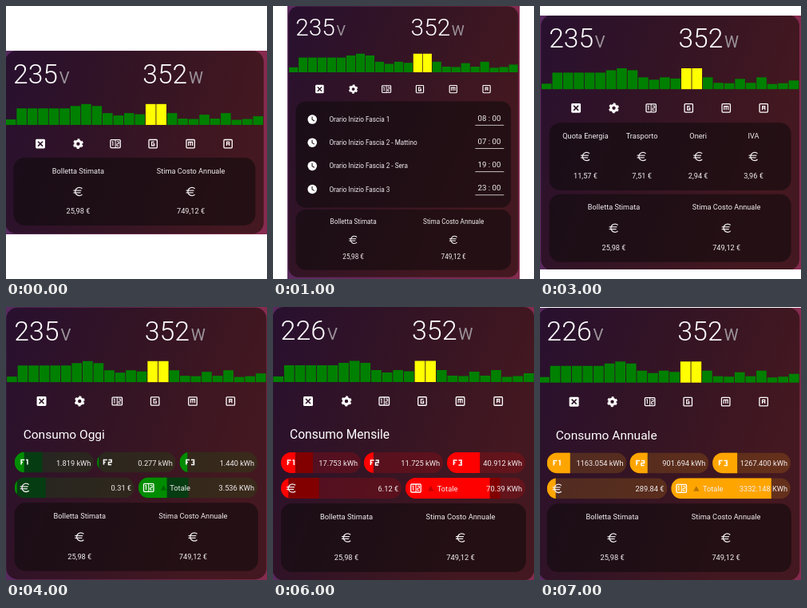
Animation, 327 px wide and 342 px high, one loop 8000 ms. Source, as an HTML page with a canvas:

```html
<!DOCTYPE html>
<html lang="it">
<head>
<meta charset="utf-8">
<style>
  html, body { margin: 0; width: 100%; height: 100%; overflow: hidden; background: #fff; }
  canvas { display: block; width: 327px; height: 342px; }
</style>
</head>
<body>
<canvas id="stage"></canvas>
<script>
const WIDTH = 327, HEIGHT = 342, LOOP = 8000;
const canvas = document.getElementById('stage');
const ctx = canvas.getContext('2d');
const ratio = window.devicePixelRatio || 1;
canvas.width = WIDTH * ratio;
canvas.height = HEIGHT * ratio;

const BARS = [7, 21, 21, 21, 21, 21, 24, 26.5, 24, 15, 12, 15, 13.5, 26.5, 26.5,
              15, 8, 7.5, 13, 8, 15, 6.5, 7.5, 11];
const SLOTS = ['08 : 00', '07 : 00', '19 : 00', '23 : 00'];
const SLOT_NAMES = ['1', '2 - Mattino', '2 - Sera', '3'];
const COSTS = [['Quota Energia', '11,57 €'], ['Trasporto', '7,51 €'], ['Oneri', '2,94 €'], ['IVA', '3,96 €']];
const TOTALS = [['Bolletta Stimata', '25,98 €'], ['Stima Costo Annuale', '749,12 €']];

// Square icon glyphs on a 2 x 2 grid: strokes of "xy" points.
const GLYPHS = {
  1: ['00 10 12'],
  2: ['00 20 21 01 02 22'],
  3: ['00 20 22 02', '11 21'],
  F: ['20 00 02', '01 11'],
  G: ['20 00 02 22 21 11'],
  M: ['02 00 20 22', '10 12'],
  A: ['02 00 20 22', '01 21']
};

// Each gauge: value text, bright share, dim share.
const today = {
  title: 'Consumo Oggi', color: '#008c00', dim: '#063c12', rgb: '0,128,0', tip: '#006400',
  gauges: [['1.819 kWh', .12, .35], ['0.277 kWh', .02, .03], ['1.440 kWh', .1, .1],
           ['0.31 €', .02, .26], ['3.536 KWh', .24, .42]]
};
const month = {
  title: 'Consumo Mensile', color: '#ff0000', dim: '#820000', rgb: '255,0,0', tip: '#c00000',
  gauges: [['17.753 kWh', .18, .4], ['11.725 kWh', .12, .12], ['40.912 kWh', .42, .42],
           ['6.12 €', .061, .315], ['70.39 KWh', .704, .79]]
};
const year = {
  title: 'Consumo Annuale', color: '#ffa500', dim: '#805200', rgb: '255,165,0', tip: '#b87400',
  gauges: [['1163.054 kWh', .29, .29], ['901.694 kWh', .225, .225], ['1267.400 kWh', .317, .317],
           ['289.84 €', .072, .072], ['3332.148 KWh', .839, .839]]
};

const scenes = [
  { start: 0, page: [0, 56, 327, 230], x: -.4, y: 56.2, scale: .987, volts: '235', totalsY: 135.6 },
  { start: 1000, page: [18, 0, 291, 342], x: 19.8, y: .5, scale: .878, volts: '235', totalsY: 290, body: drawSlots },
  { start: 3000, page: [0, 12, 327, 318], x: 1.7, y: 11.4, scale: .987, volts: '235', totalsY: 227.3,
    body: () => drawPanel(136.5, COSTS, [56, 127.5, 199, 269.3]) },
  { start: 4000, x: .8, y: .7, scale: .994, volts: '235', usage: today },
  { start: 5000, x: 0, y: 0, scale: 1, volts: '226', usage: month },
  { start: 7000, page: [0, 1, 327, 341], x: -1.2, y: 1, scale: .997, volts: '226', usage: year }
];

function box(x, y, w, h, r, fill) {
  ctx.beginPath();
  ctx.roundRect(x, y, w, h, r);
  ctx.fillStyle = fill;
  ctx.fill();
}

function text(str, x, y, size = 9.3, align = 'left', weight = 400, fill = '#f2eef0') {
  ctx.font = `${weight} ${size}px Roboto, sans-serif`;
  ctx.textAlign = align;
  ctx.fillStyle = fill;
  ctx.fillText(str, x, y);
}

function line(width, ...points) {
  ctx.beginPath();
  points.forEach(([x, y], i) => i ? ctx.lineTo(x, y) : ctx.moveTo(x, y));
  ctx.lineWidth = width;
  ctx.stroke();
}

function ring(x, y, r, width, from = 0, to = Math.PI * 2) {
  ctx.beginPath();
  ctx.arc(x, y, r, from, to);
  ctx.lineWidth = width;
  ctx.stroke();
}

function outline(x, y, w, h) {
  ctx.beginPath();
  ctx.roundRect(x - w / 2, y - h / 2, w, h, 1);
  ctx.lineWidth = 1.3;
  ctx.stroke();
}

// Draws an icon glyph centred on x, y.
function glyph(char, x, y, w, h, width) {
  ctx.strokeStyle = '#fff';
  for (const stroke of GLYPHS[char]) {
    line(width, ...stroke.split(' ').map(([gx, gy]) => [x + (gx - 1) * w / 2, y + (gy - 1) * h / 2]));
  }
}

function euro(x, y) {
  ctx.strokeStyle = '#f2eef0';
  ring(x + 1.5, y, 5.2, 1.3, .8, Math.PI * 2 - .8);
  line(1.2, [x - 6, y - 1.4], [x + 4, y - 1.4]);
  line(1.2, [x - 6, y + 1.4], [x + 3.2, y + 1.4]);
}

function counter(x, y) {
  ctx.strokeStyle = '#fff';
  outline(x, y, 12.5, 10);
  line(1, [x, y - 5], [x, y + 5]);
  glyph(1, x - 3.3, y, 2.4, 5.4, 1.1);
  glyph(2, x + 3.1, y, 2.6, 5.4, 1);
}

function gear(x, y) {
  ctx.strokeStyle = '#fff';
  ring(x, y, 3.7, 3);
  const tooth = Math.PI * 5.5 / 6;
  ctx.setLineDash([tooth, tooth]);
  ring(x, y, 5.5, 2, Math.PI / 12, Math.PI * 25 / 12);
  ctx.setLineDash([]);
}

function drawHeader(volts) {
  text(volts, 9.6, 41.3, 34, 'left', 300, '#fff');
  text('V', 68, 41.3, 20.5, 'left', 400, '#9c939a');
  text('352', 174, 41.3, 34, 'left', 300, '#fff');
  text('W', 232.3, 41.3, 20.5, 'left', 400, '#9c939a');

  const pitch = 13.64;
  BARS.forEach((h, i) => {
    ctx.fillStyle = i === 13 || i === 14 ? '#ffff00' : '#008000';
    ctx.fillRect(i * pitch + .3, 94 - h, pitch - .9, h);
  });

  box(38, 112, 12, 12, 1.5, '#fff');
  ctx.strokeStyle = '#2a1224';
  line(1.6, [41, 115], [47, 121]);
  line(1.6, [47, 115], [41, 121]);
  gear(92, 118);
  counter(139.3, 118);
  ['G', 'M', 'A'].forEach((letter, i) => {
    const x = 187 + i * 47.6;
    ctx.strokeStyle = '#fff';
    outline(x, 118, 10.5, 10.5);
    glyph(letter, x, 118, letter === 'M' ? 5 : 3.2, 4.6, 1.2);
  });
}

function panelBack(y, h) {
  box(10, y, 307, h, 14, 'rgba(15,10,13,.6)');
}

function drawPanel(y, items, centers) {
  panelBack(y, 86);
  items.forEach(([label, amount], i) => {
    text(label, centers[i], y + 20, 9.3, 'center');
    euro(centers[i], y + 43);
    text(amount, centers[i], y + 71, 9.3, 'center');
  });
}

function drawSlots() {
  panelBack(135.5, 151.5);
  SLOTS.forEach((time, i) => {
    const y = 161.2 + i * 33.2;
    ctx.beginPath();
    ctx.arc(33.5, y, 6.6, 0, Math.PI * 2);
    ctx.fillStyle = '#fff';
    ctx.fill();
    ctx.strokeStyle = '#21131a';
    line(1.2, [33.3, y - 4], [33.3, y + .3], [36.5, y + 2.2]);
    text('Orario Inizio Fascia ' + SLOT_NAMES[i], 57.7, y + 3.6);
    text(time, 286, y + 2.2, 11, 'center');
    ctx.fillStyle = '#d8d2d5';
    ctx.fillRect(266, y + 7.8, 41, 1);
  });
}

function drawGauge(x, y, w, [value, bright, dim], usage) {
  ctx.save();
  ctx.beginPath();
  ctx.roundRect(x, y, w, 26, 13);
  ctx.clip();
  const fill = (share, color) => {
    ctx.fillStyle = color;
    ctx.fillRect(x, y, w * share, 26);
  };
  fill(1, `rgba(${usage.rgb},.17)`);
  fill(dim, usage.dim);
  fill(bright, usage.color);
  ctx.restore();
  text(value, x + w - 3.8, y + 17, 9.3, 'right');
}

function drawUsage(usage) {
  text(usage.title, 21, 165, 15.6, 'left', 400, '#fff');
  const spots = [[10, 182, 100], [114, 182, 99], [218, 182, 98], [10, 214, 151], [166, 214, 150]];
  spots.forEach(([x, y, w], i) => {
    drawGauge(x, y, w, usage.gauges[i], usage);
    if (i < 3) {
      glyph('F', x + 10.5, y + 13, 4.2, 6, 1.5);
      glyph(i + 1, x + 16.3, y + 13, 3.6, 6, 1.5);
    }
  });
  euro(23, 227);
  counter(179, 227);
  ctx.beginPath();
  ctx.moveTo(194, 230.5);
  ctx.lineTo(197.7, 224);
  ctx.lineTo(201.4, 230.5);
  ctx.fillStyle = usage.tip;
  ctx.fill();
  text('Totale', 205.7, 231);
}

function gradient(x0, y0, x1, y1, ...colors) {
  const g = ctx.createLinearGradient(x0, y0, x1, y1);
  colors.forEach((c, i) => g.addColorStop(i / (colors.length - 1), c));
  return g;
}

function drawScene({ page = [0, 0, WIDTH, HEIGHT], x, y, scale, volts, totalsY = 246, body, usage }) {
  ctx.setTransform(ratio, 0, 0, ratio, 0, 0);
  ctx.fillStyle = '#fff';
  ctx.fillRect(0, 0, WIDTH, HEIGHT);
  ctx.save();
  ctx.beginPath();
  ctx.rect(...page);
  ctx.clip();
  ctx.fillStyle = gradient(0, 0, WIDTH, 0, '#58295f', '#862b4f');
  ctx.fillRect(...page);
  ctx.translate(x, y);
  ctx.scale(scale, scale);

  const bottom = totalsY + 96.5;
  box(-.5, 0, 328, bottom, 14, gradient(0, 0, 327, bottom * .35, '#28102f', '#341424', '#441820'));
  drawHeader(volts);
  if (body) body();
  if (usage) drawUsage(usage);
  drawPanel(totalsY, TOTALS, [92, 235]);
  ctx.restore();
}

function frame() {
  const time = performance.now() % LOOP;
  drawScene(scenes.findLast(scene => scene.start <= time));
  requestAnimationFrame(frame);
}
frame();
</script>
</body>
</html>
```
